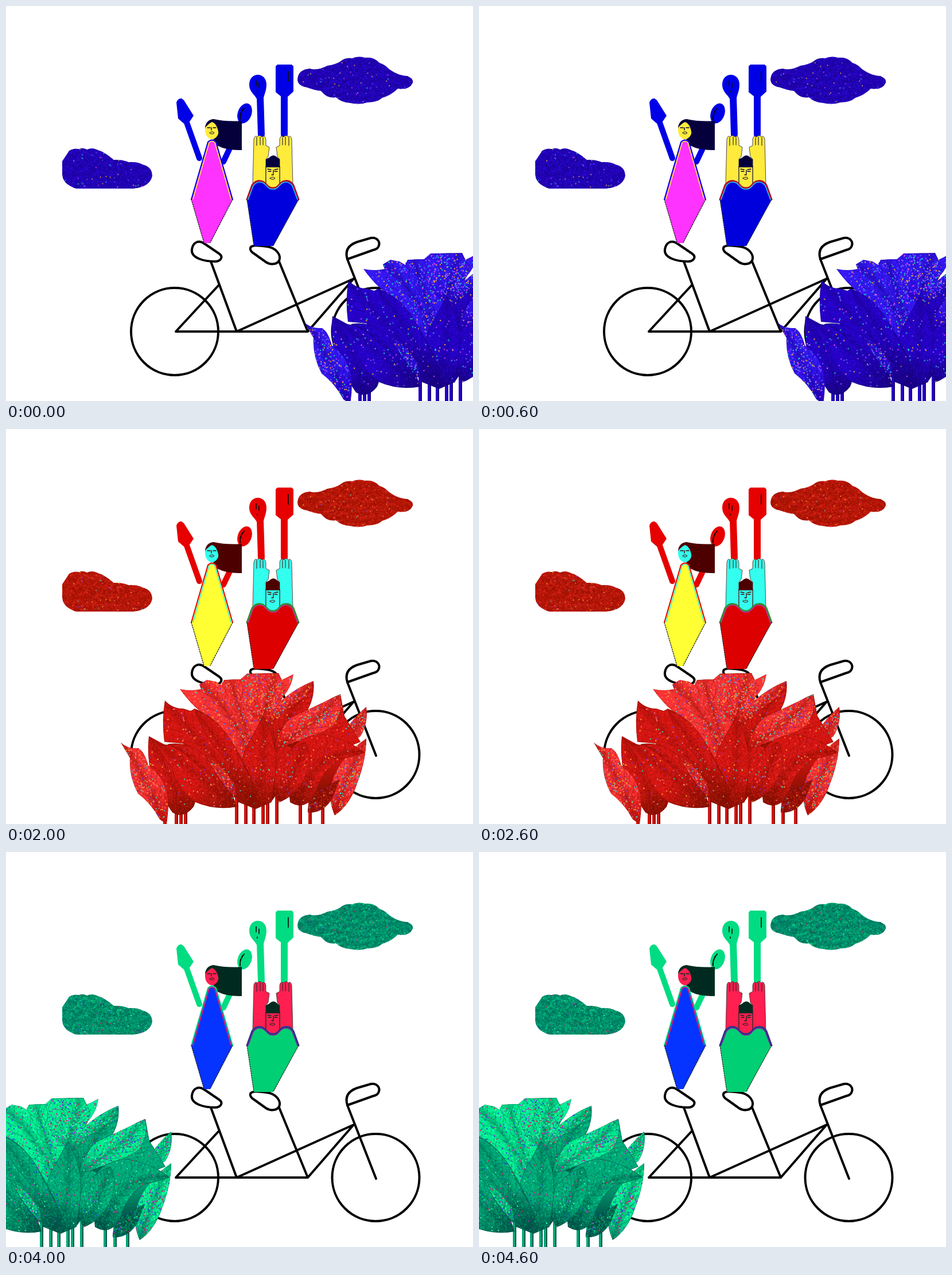
An HTML page with a canvas that plays this animation: 814 by 688 pixels, repeating every 5 s.

```html
<!DOCTYPE html>
<html lang="en">
<head>
<meta charset="utf-8">
<title>Tandem</title>
<style>
html, body { margin: 0; width: 100%; height: 100%; overflow: hidden; background: #fff; }
canvas { display: block; }
</style>
</head>
<body>
<canvas id="stage" width="814" height="688"></canvas>
<script>
const ctx = document.getElementById('stage').getContext('2d');

// leaf tones run light, mid, dark; (x, y) shifts the plant
const scenes = [
  { x: 320, y: 5, main: '#0000e6', skin: '#ffeb3b', dress: '#ff33ff', skirt: '#0000dc', hair: '#05003c',
    cloud: '#2200b4', tones: ['#3518f4', '#2600c8', '#180080'], trim: ['#b01030', '#30c8e0'],
    specks: ['#ffb030', '#e040ff', '#20d0c0', '#6a60ff', '#6a60ff'] },
  { x: 156, y: 5, main: '#e6d600', skin: '#4066ff', dress: '#4dff33', skirt: '#dcc400', hair: '#4d4200',
    cloud: '#b8a800', tones: ['#f6e02c', '#c8b814', '#7c7000'], trim: ['#309888', '#e05020'],
    specks: ['#2050e0', '#e03020', '#30a050', '#fff060', '#fff060'] },
  { x: 0, y: 0, main: '#e60000', skin: '#33ffee', dress: '#ffff33', skirt: '#dc0000', hair: '#4d0000',
    cloud: '#b41400', tones: ['#fa3434', '#d41410', '#851000'], trim: ['#309030', '#c030a0'],
    specks: ['#ffb030', '#40d0c0', '#8030d0', '#ff7070', '#ff7070'] },
  { x: -125, y: 2, main: '#b300ff', skin: '#4dff00', dress: '#ff0033', skirt: '#b000ff', hair: '#4d0073',
    cloud: '#9200d4', tones: ['#b800ff', '#a600ea', '#7400a4'], trim: ['#d08020', '#3040e0'],
    specks: ['#ffe030', '#30d060', '#20a0ff', '#c840ff', '#c840ff'] },
  { x: -340, y: 3, main: '#00dc82', skin: '#ff1f50', dress: '#0533ff', skirt: '#00cf73', hair: '#002a20',
    cloud: '#008a6c', tones: ['#00f094', '#00a878', '#005448'], trim: ['#303088', '#8020a0'],
    specks: ['#e02050', '#c030d0', '#2040e0', '#40ffb0', '#40ffb0'] }
];

let seed, scene;
const rnd = () => (seed = seed * 16807 % 2147483647) / 2147483647;

function fill(d, color) {
  ctx.fillStyle = color;
  ctx.fill(new Path2D(d));
}

function line(d, color, width = 1, dash = []) {
  ctx.strokeStyle = color;
  ctx.lineWidth = width;
  ctx.setLineDash(dash);
  ctx.stroke(new Path2D(d));
  ctx.setLineDash([]);
}

function oval(x, y, rx, ry, color, turn = 0) {
  ctx.fillStyle = color;
  ctx.beginPath();
  ctx.ellipse(x, y, rx, ry, turn, 0, 7);
  ctx.fill();
}

// Point at t on a quadratic rib
function along([x0, y0, cx, cy, x1, y1], t) {
  const u = 1 - t;
  return [u * u * x0 + 2 * u * t * cx + t * t * x1, u * u * y0 + 2 * u * t * cy + t * t * y1];
}

function grain(rib, spread, count, size, alpha, colors) {
  ctx.globalAlpha = alpha;
  for (let i = 0; i < count; i++) {
    const [x, y] = along(rib, rnd());
    ctx.fillStyle = colors[Math.floor(rnd() * colors.length)];
    ctx.fillRect(x + (rnd() - .5) * spread, y + (rnd() - .5) * spread, size, size);
  }
  ctx.globalAlpha = 1;
}

function leaf(tone, d, ...rib) {
  const { tones, specks } = scene, path = new Path2D(d);
  const [x0, y0, , , x1, y1] = rib;
  const shade = ctx.createLinearGradient(x0, y0, x1, y1);
  shade.addColorStop(0, tones[tone]);
  shade.addColorStop(.6, tones[tone]);
  shade.addColorStop(1, tones[Math.min(tone + 1, 2)]);
  ctx.save();
  ctx.clip(path);
  ctx.fillStyle = shade;
  ctx.fill(path);
  // soft shadow beside the rib, then the veins
  ctx.globalAlpha = .18;
  for (const width of [16, 7, 2]) line(`M${x0} ${y0}Q${rib.slice(2)}`, tones[2], width);
  ctx.globalAlpha = .4;
  const angle = Math.atan2(y0 - y1, x0 - x1);
  for (let t = .1; t < 1; t += .11) {
    const [x, y] = along(rib, t);
    for (const side of [-.6, .6]) {
      const a = angle + side;
      line(`M${x} ${y}l${45 * Math.cos(a)} ${45 * Math.sin(a)}`, tones[2], 1.2);
    }
  }
  grain(rib, 100, 2200, 2, .28, [tones[0], tones[0], tones[2]]);
  grain(rib, 100, tone ? 90 : 500, 2.2, .85, specks);
  ctx.globalAlpha = .6;
  ctx.strokeStyle = tones[2];
  ctx.lineWidth = tone ? 2 : 1;
  ctx.stroke(path);
  ctx.restore();
}

function plant() {
  ctx.save();
  ctx.translate(scene.x, scene.y);
  for (const x of [277, 297, 305, 313, 402, 418, 432, 448, 456, 472, 513, 530, 552]) {
    line(`M${x} 630V690`, scene.tones[1], 6);
    line(`M${x + 2} 630V690`, scene.tones[2], 2);
  }
  // shaded mass closing the gaps between leaves
  leaf(1, 'M345 500L460 470 560 500 606 545 588 590 566 640 540 635 490 610 462 650 400 640 300 560Z', 460, 480, 470, 560, 470, 640);
  // broad leaves at the back
  leaf(0, 'M404 440L420 426 475 425 481 437 501 427Q498 450 483 466L455 530 442 610 405 560 385 470Z', 450, 428, 455, 510, 435, 620);
  leaf(0, 'M303 453Q323 457 340 453L337 445 350 437 366 440 376 446 380 437 408 436Q430 480 452 520L440 625Q395 550 350 500Q326 485 303 453Z', 340, 445, 410, 500, 440, 620);
  leaf(0, 'M376 443Q382 434 408 437Q420 470 440 510L450 600 425 550Q398 490 376 443Z', 392, 440, 410, 500, 445, 600);
  leaf(0, 'M420 427L475 426 480 438Q493 452 480 470L456 515Q430 510 414 475Q408 450 420 427Z', 468, 430, 455, 470, 448, 515);
  // right side
  leaf(1, 'M536 439Q540 475 515 505L480 540 458 580Q446 530 463 497Q487 460 536 439Z', 536, 439, 500, 490, 456, 572);
  leaf(0, 'M536 439Q528 468 500 480L457 520Q460 488 487 467Q510 449 536 439Z', 532, 444, 500, 475, 458, 518);
  leaf(0, 'M628 484Q632 512 618 535L600 548 585 535Q604 503 628 484Z', 628, 485, 615, 518, 592, 542);
  leaf(1, 'M583 462L590 500 618 545 580 560 520 565 490 552Q530 480 583 462Z', 582, 464, 570, 520, 495, 555);
  leaf(0, 'M583 462Q588 492 573 514Q540 538 505 545L467 560Q473 525 497 502Q530 487 583 462Z', 581, 465, 545, 507, 470, 556);
  leaf(0, 'M628 539Q628 575 613 615Q600 655 573 673Q560 645 568 615Q582 570 628 539Z', 627, 542, 595, 600, 573, 670);
  leaf(1, 'M626 564Q590 536 545 531Q500 540 488 572L495 650Q518 665 538 640Q548 597 580 577Z', 620, 563, 540, 555, 510, 650);
  leaf(2, 'M582 610Q562 620 540 632Q525 650 526 668Q552 670 568 645Z', 580, 614, 548, 635, 530, 665);
  leaf(1, 'M522 545Q538 575 521 608Q505 640 474 651Q462 620 472 583Q492 555 522 545Z', 520, 549, 505, 600, 475, 648);
  // heart of the plant
  leaf(1, 'M448 500Q475 545 470 600L463 650 435 662 405 650Q400 600 418 555Z', 448, 505, 455, 590, 432, 658);
  leaf(1, 'M277 473Q290 487 309 487L322 491 329 487Q364 501 383 530Q412 568 438 632L430 660 400 640Q345 560 310 548L276 545Q271 507 277 473Z', 278, 475, 325, 530, 430, 645);
  leaf(1, 'M329 488Q372 507 394 545Q414 583 438 630L431 655Q405 600 374 566Q341 530 329 488Z', 331, 492, 371, 540, 432, 648);
  leaf(0, 'M350 571Q382 588 400 625L402 645Q372 622 350 571Z', 352, 574, 380, 605, 401, 642);
  // left side
  leaf(1, 'M249 535Q245 567 253 602Q270 640 290 668Q310 680 327 658Q338 632 323 610L277 550Z', 251, 540, 290, 600, 307, 668);
  leaf(1, 'M249 535Q262 549 281 550Q320 542 350 572Q370 610 395 637L402 658Q365 665 330 650Q300 630 288 590Z', 252, 538, 320, 590, 397, 655);
  leaf(1, 'M281 549Q320 542 350 572Q370 610 395 637L401 656Q360 625 337 590Q310 560 281 549Z', 284, 550, 335, 570, 398, 652);
  leaf(0, 'M200 546Q211 557 231 556Q242 563 248 586Q274 604 281 635Q285 658 280 688L268 680Q253 652 230 635Q214 605 216 573Z', 202, 548, 242, 600, 274, 682);
  ctx.restore();
}

function cloud(d, ...rib) {
  const { cloud: base, tones, specks } = scene, path = new Path2D(d);
  ctx.save();
  ctx.clip(path);
  ctx.fillStyle = base;
  ctx.fill(path);
  // rows of soft puffs
  ctx.globalAlpha = .16;
  for (let row = 0; row < 7; row++)
    for (let x = rib[0] - 10 + row % 2 * 12; x < rib[4] + 20; x += 25) {
      const y = rib[1] - 44 + row * 15 + Math.sin(x / 23) * 4;
      line(`M${x} ${y}q11 -12 22 1q-4 8 -14 7`, tones[2], 5);
      line(`M${x + 2} ${y + 6}q9 -9 17 0`, tones[0], 4);
    }
  grain(rib, 95, 6000, 2, .25, [tones[0], tones[2]]);
  grain(rib, 95, 90, 2, .7, specks);
  ctx.restore();
}

function bike() {
  for (const d of [
    'M370 567A76 76 0 1 1 218 567A76 76 0 1 1 370 567',
    'M720.5 567A76 76 0 1 1 568.5 567A76 76 0 1 1 720.5 567',
    'M357 445L402 567M371 486L296 567H526L476 445M402 567L606 475 526 567M595 441L645 569',
    'M324 424C326 411 336 407 346 414L371 431C380 437 374 445 364 445C348 445 322 440 324 424Z',
    'M426 424C424 415 440 417 455 419C470 421 478 432 477 440C476 450 462 452 453 446L432 431Q427 428 426 424Z',
    'M595 441C590 425 598 416 612 411L636 404C647 402 652 411 650 417C649 421 645 424 640 425Z'
  ]) line(d, '#000', 4);
}

function woman() {
  const { main, skin, dress, hair } = scene;
  line('M315 203L337 265M389 250L379 271', main, 10);
  fill('M297 168Q300 160 306 161L310 164 327 191 319 203Q313 208 308 203L300 196Z', main);
  oval(416, 187, 12, 18, main, .35);
  line('M410 199L405 209', main, 7);
  line('M408 198Q407 187 415 178', '#000', 2, [5, 2]);
  fill('M347 215Q347 199 362 197Q385 202 411 200V251Q385 252 368 243L360 230Z', hair);
  oval(359, 216, 12, 16, skin);
  fill('M347 212Q349 198 362 197Q374 202 371 225Q369 205 359 202Q353 205 347 212Z', hair);
  line('M351 212h5M361 212h5M358 212v4', hair, 1.5);
  line('M355 221q4 -4 8 0q-4 4 -8 0', hair, 1);
  fill('M352 236Q359 229 366 236L395 337 356 413H345L323 337Z', dress);
  line('M323 337L352 237Q359 230 366 237L395 337', main, 2);
  line('M326 336L354 238Q359 233 364 238L392 336', skin, 1.5);
  line('M323 337L345 412M395 337L356 412', '#222', 1.3, [2, 2]);
}

function man() {
  const { main, skin, skirt, hair, trim } = scene;
  line('M443 158L445 224M485 150V224', main, 12);
  fill('M424 137C424 114 454 114 454 137C454 150 448 157 448 168H439C438 156 424 152 424 137Z', main);
  fill('M470 105L473 102H498L501 105V149L491 158H480L470 150Z', main);
  line('M436 130v9M441 134v8M438 148v2M492 114v17', '#111', 1.7);
  const arm = 'M430 312L432 232Q434 224 438 228Q442 223 446 228Q452 224 453 233V243L459 246 457 262 453 267V312Z';
  const fingers = 'M437 229v14M443 228v14M448 229v13';
  const arms = () => {
    fill(arm, skin);
    line(arm, hair, .7);
    line(fingers, hair, 1);
  };
  arms();
  ctx.save();
  ctx.translate(930, 0);
  ctx.scale(-1, 1);
  arms();
  ctx.restore();
  fill('M453 279H477V308Q476 317 465 317Q454 317 453 308Z', skin);
  line('M453 279V308Q454 317 465 317Q476 317 477 308V279', hair, 1);
  fill('M453 281V267L459 264Q466 257 472 263L477 267V281Z', hair);
  line('M456 284l6 1M468 285l6 -1M457 288h5M468 288h5M466 286v8h-3', hair, 1.3);
  line('M460 300q5 -4 9 0q-4 4 -9 0', hair, 1);
  const hem = 'M420 337L429 312Q437 301 448 306C455 310 456 317 465 317C475 317 475 310 482 306Q494 301 501 312L510 337';
  fill(hem + 'L466 418H432Z', skirt);
  line(hem, trim[0], 3);
  line('M422 337L431 313Q438 304 448 308C455 312 456 319 465 319C475 319 475 312 482 308Q492 304 499 313L508 337', trim[1], 1.5);
  line('M420 337L432 417M510 337L466 417', '#222', 1.2, [2, 2]);
}

function draw(index) {
  scene = scenes[index];
  seed = 4711;
  ctx.fillStyle = '#fff';
  ctx.fillRect(0, 0, 814, 688);
  ctx.lineCap = ctx.lineJoin = 'round';
  cloud('M98 270Q103 263 110 252Q118 247 127 249Q134 246 141 250Q150 246 158 250Q172 254 188 268Q201 267 214 272Q228 271 238 276Q255 280 255 296Q252 312 230 317L222 318H122Q98 310 98 293Z', 100, 285, 180, 285, 254, 296);
  cloud('M508 128Q509 110 530 109Q542 113 560 104Q574 102 582 97Q592 89 603 91Q615 86 626 90Q641 88 651 99Q661 102 668 110Q683 121 700 122Q711 127 709 134Q703 147 683 144Q672 155 656 160Q647 168 630 168Q615 173 600 169Q584 168 575 159Q560 162 549 148Q538 147 525 142Q508 139 508 128Z', 510, 130, 610, 130, 708, 132);
  bike();
  woman();
  man();
  plant();
}

let shown = -1;
function tick() {
  const index = Math.floor(performance.now() / 1000) % scenes.length;
  if (index !== shown) draw(shown = index);
  requestAnimationFrame(tick);
}
tick();
</script>
</body>
</html>
```
